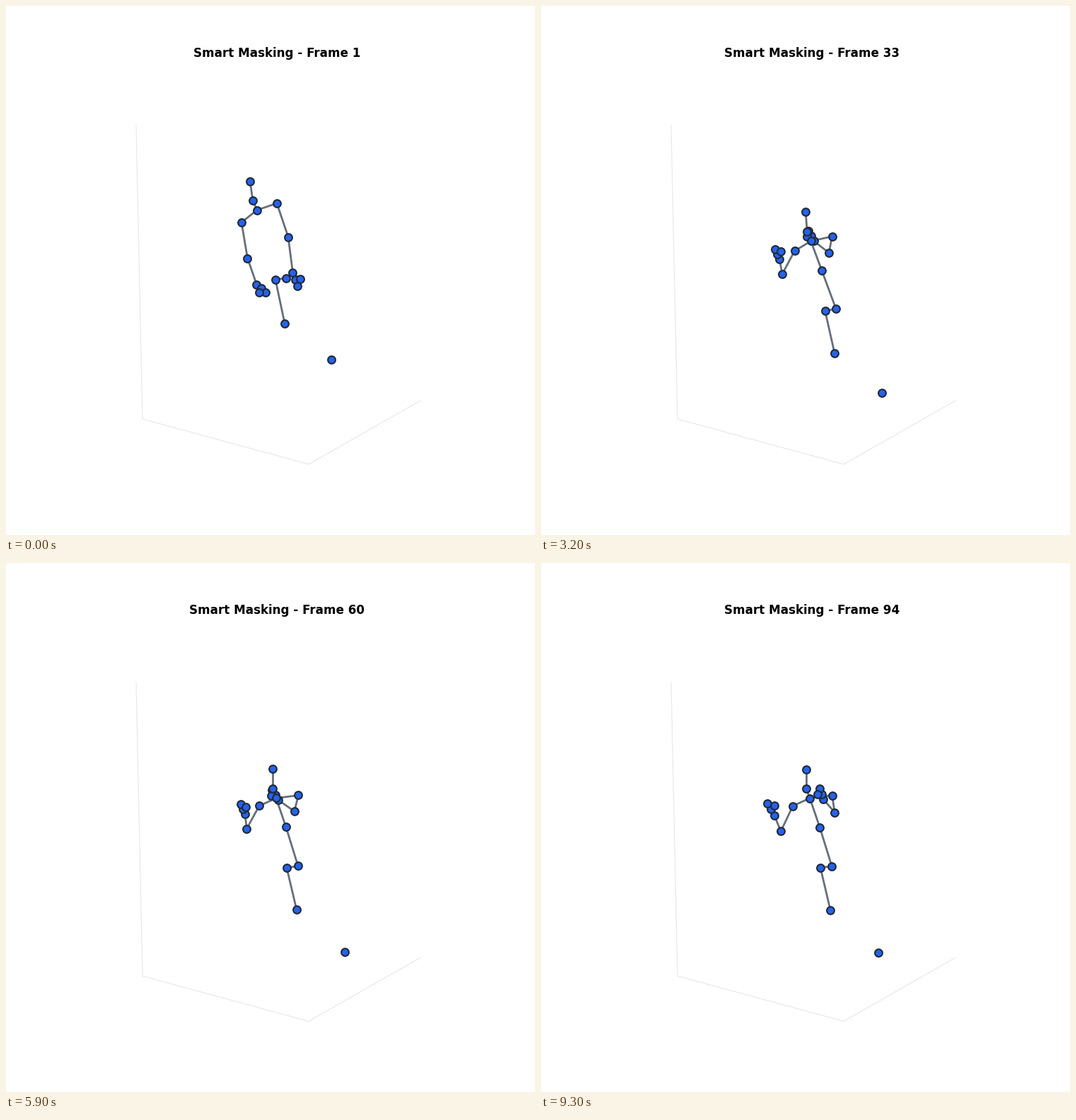
Recreate the animation shown at these times as a matplotlib script. Size 748 px wide and 748 px high, loop 9400 ms.

```python
import numpy as np
import matplotlib.pyplot as plt
from matplotlib.animation import FuncAnimation
from matplotlib.collections import LineCollection

SIZE, DPI = 748, 100
FRAMES, STEP_MS = 94, 100
MID_SHOWN_FROM = 8

# Points are complex numbers x + yj in pixels, y downwards.
# Body offsets from the chest: neck, head, mid, base, hip, knee, foot, shoulders.
UPRIGHT = np.array([-6 - 13.5j, -10 - 41j, 17 + 42j, 41 + 96j, 26 + 98.5j,
                    39 + 160j, 105 + 211j, -22 + 17.5j, 28 - 9.5j])
SETTLED = np.array([-5 - 13.5j, -5 - 41j, 14 + 41j, 31 + 96j, 15 + 98.5j,
                    29 + 158j, 97 + 218j, -24 + 11j, 31.5 - 4j])


# Each pose: chest, then upper arm, forearm and hand of the left and right arm.
def pose(chest, *arms):
    return chest, np.array(arms)


REST = pose(355 + 288.5j, 8.5 + 50.5j, 13 + 37.5j, 12.5 + 10.5j,
            16 + 47.5j, 6.5 + 50.5j, 6.5 + 19j)
HANG = pose(365.5 + 288.5j, -1 + 54j, -7.5 + 42.5j, -3.5 + 27j,
            12 + 46.5j, 9.5 + 43j, 4 + 24.5j)
OPEN = pose(374 + 332.5j, -12.5 + 48.5j, -35.5 - 11j, -28 - 18j,
            28 + 2.5j, 1.5 - 13.5j, 4.5 - 11.5j)
LOW = pose(369.5 + 317.5j, -11 + 44.5j, -29 + 16j, -20.5 + 11j,
           32 + 22.5j, 9, 8.5 - 4j)
FOLD = pose(382 + 332.5j, -17.5 + 32j, -2.5 - 20.5j, -5.5 - 14j,
            -6 + 22.5j, -23 - 16j, -8.5 - 14j)


def mix(a, b, w):
    """Move the chest straight; turn and stretch the arm bones."""
    (chest_a, arms_a), (chest_b, arms_b) = a, b
    length = abs(arms_a) + w * (abs(arms_b) - abs(arms_a))
    angle = np.angle(arms_a) + w * np.angle(arms_b / arms_a)
    return chest_a + w * (chest_b - chest_a), length * np.exp(1j * angle)


def smooth(t, start, end):
    u = np.clip((t - start) / (end - start), 0, 1)
    return u * u * (3 - 2 * u)


def pose_at(t):
    opening = (0.5 + 0.5 * np.cos(2 * np.pi * (t - 2.3) / 2.55)) ** 2
    lowering = np.exp(-((t - 4) / 0.35) ** 2)
    cycle = mix(mix(FOLD, OPEN, opening), LOW, lowering)
    start = mix(REST, HANG, smooth(t, 0, 1.6))
    return mix(start, cycle, smooth(t, 1.6, 2.4))


def arm_points(shoulder, bones, thumb_turn):
    upper, fore, hand = bones
    elbow = shoulder + upper
    wrist = elbow + fore
    thumb = wrist + 0.7 * hand * np.exp(1j * np.radians(thumb_turn))
    return [shoulder, elbow, wrist, wrist + hand / 2, wrist + hand, thumb]


def skeleton(t, show_mid):
    """Return joints in drawing order and the bones as point pairs."""
    chest, arms = pose_at(t)
    body = chest + UPRIGHT + (SETTLED - UPRIGHT) * min(t / 5.9, 1)
    neck, head, mid, base, hip, knee, foot, left, right = body
    arm_l = arm_points(left, arms[:3], 30)
    arm_r = arm_points(right, arms[3:], -30)

    chains = [[chest, neck, head], [base, hip, knee]]
    if show_mid:
        chains.append([chest, mid, base])
    for arm in (arm_l, arm_r):
        chains += [[chest] + arm[:5], [arm[2], arm[5]]]
    pairs = [pair for chain in chains for pair in zip(chain, chain[1:])]

    spine = [mid] if show_mid else []
    dots = arm_l + arm_r + [foot, knee, hip, base] + spine + [head, neck, chest]
    return to_xy(dots), to_xy(pairs)


def to_xy(points):
    z = np.array(points)
    return np.stack([z.real, z.imag], axis=-1)


fig = plt.figure(figsize=(SIZE / DPI, SIZE / DPI), dpi=DPI, facecolor="white")
ax = fig.add_axes([0, 0, 1, 1])
ax.set_xlim(0, SIZE)
ax.set_ylim(SIZE, 0)
ax.axis("off")

ax.plot([184, 193, 428, 586], [168.5, 584, 648, 558], color="#e7e7e7", lw=0.8)
bones = LineCollection([], colors="#4b5563", linewidths=2, alpha=0.85, zorder=3)
ax.add_collection(bones)
dots = ax.scatter([], [], s=60, c="#2563eb", edgecolors="#1f2937",
                  linewidths=1.5, zorder=4)
title = ax.text(383, 72, "", ha="center", va="baseline", fontsize=12.1,
                fontweight="bold", family="DejaVu Sans", color="black")


def update(i):
    points, pairs = skeleton(i * STEP_MS / 1000, i >= MID_SHOWN_FROM)
    dots.set_offsets(points)
    bones.set_segments(pairs)
    title.set_text(f"Smart Masking - Frame {i + 1}")
    return bones, dots, title


anim = FuncAnimation(fig, update, frames=FRAMES, interval=STEP_MS,
                     repeat=True, repeat_delay=0, blit=False)
plt.show()
```
